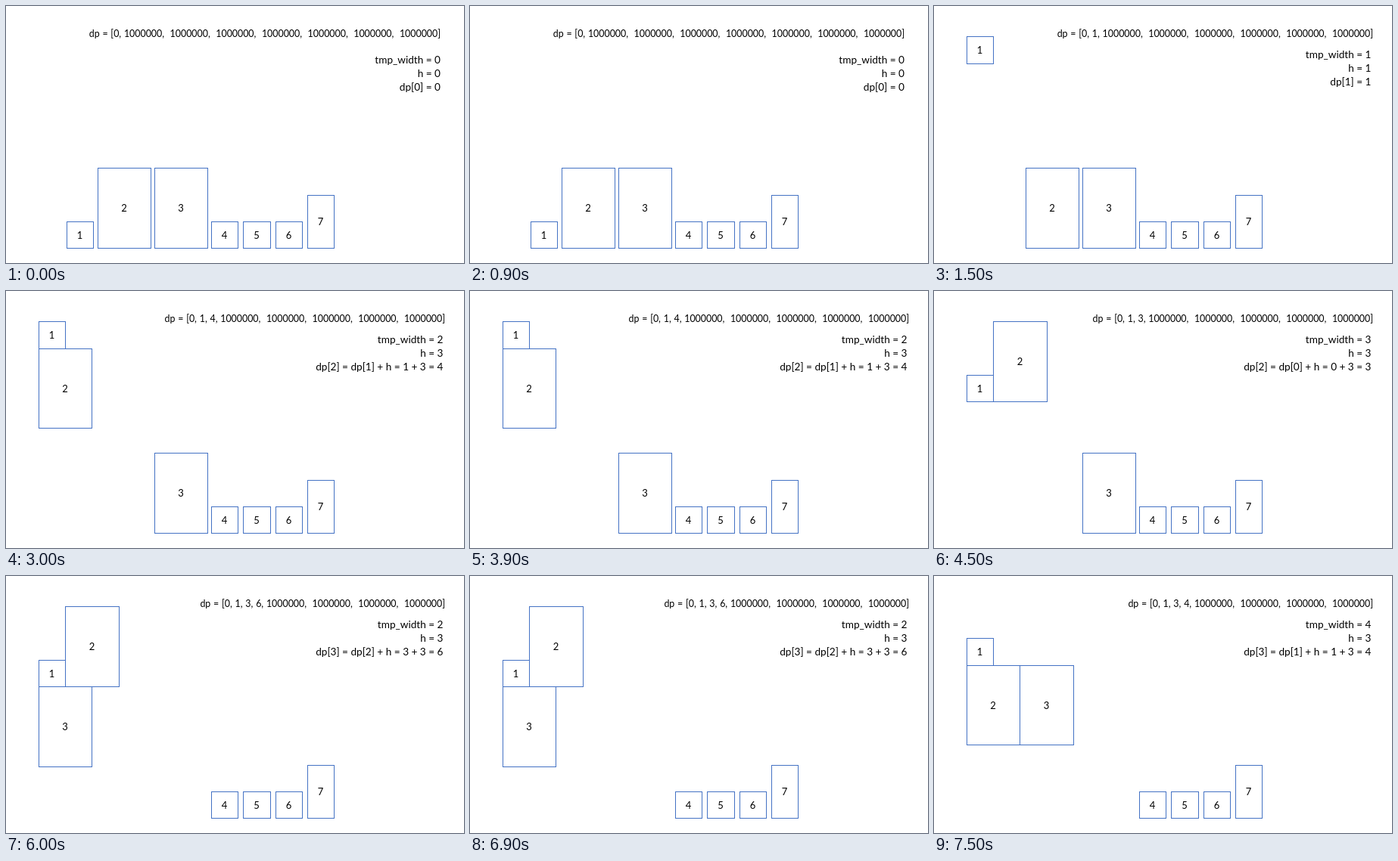
Animation, 605 px wide and 340 px high, one loop 8 s. Source, as an HTML page:

```html
<!DOCTYPE html>
<html lang="en">
<head>
<meta charset="utf-8">
<title>Bookshelf dynamic programming</title>
<style>
  html, body { margin: 0; width: 100%; height: 100%; overflow: hidden; background: #fff; }
  svg { display: block; width: 100%; height: 100%; }
  rect { fill: #fff; stroke: #4472c4; }
  text { font: 13.6px Lato, sans-serif; white-space: pre; text-anchor: end; }
  .label { font-size: 13px; text-anchor: middle; }
  .array { font-size: 12.4px; word-spacing: .6px; }
</style>
</head>
<body>
<svg id="stage" viewBox="0 0 605 340"></svg>
<script>
const STEP = 1500, LOOP = 8000;
const UNIT = 35.28, FLOOR = 320.7, SHELF_LEFT = 43.3, SHELF_TOP = 40.75;
const stage = document.getElementById('stage');

// Thickness and height in units; x is the place in the waiting row
const books = [
  { x: 80.3, w: 1, h: 1 }, { x: 121.3, w: 2, h: 3 }, { x: 196.3, w: 2, h: 3 },
  { x: 271.3, w: 1, h: 1 }, { x: 313.8, w: 1, h: 1 }, { x: 356.3, w: 1, h: 1 },
  { x: 398.3, w: 1, h: 2 }
];

// Each step arranges book numbers in rows, from top to bottom
const steps = [
  { rows: [] },
  { rows: [[1]] },
  { rows: [[1], [2]] },
  { rows: [[1, 2]] },
  { rows: [[1, 2], [3]] },
  { rows: [[1], [2, 3]], top: 82.75 }
];

const text = (x, y, value, cls = '') => `<text x="${x}" y="${y}" class="${cls}">${value}</text>`;

// Draws a book standing on the given bottom line, snapped to whole pixels
function drawBook(id, left, bottom) {
  const { w, h } = books[id - 1];
  const [x, y, right, base] =
    [left, bottom - h * UNIT, left + w * UNIT, bottom].map(Math.floor);
  return `<rect x="${x + .5}" y="${y + .5}" width="${right - x}" height="${base - y}"/>` +
    text((x + right) / 2, Math.round((y + base) / 2 + 5), id, 'label');
}

const rowHeight = row => Math.max(0, ...row.map(id => books[id - 1].h));
const rowWidth = row => row.reduce((sum, id) => sum + books[id - 1].w, 0);

function drawShelves(rows, bottom) {
  return rows.map(row => {
    bottom += rowHeight(row) * UNIT;
    let x = SHELF_LEFT;
    return row.map(id => {
      const drawn = drawBook(id, x, bottom);
      x += books[id - 1].w * UNIT;
      return drawn;
    }).join('');
  }).join('');
}

function drawArray(dp, right) {
  const unknown = Array(books.length + 1 - dp.length).fill('1000000').join(',  ');
  return text(right, 41, `dp = [${dp.join(', ')}, ${unknown}]`, 'array');
}

const dp = [0];
const pictures = steps.map(({ rows, top = SHELF_TOP }) => {
  const count = rows.flat().length;
  const lastRow = rows.at(-1) || [];
  const from = count - lastRow.length;
  const height = rowHeight(lastRow);
  dp[count] = dp[from] + height;

  const sum = count > 1 ? `dp[${from}] + h = ${dp[from]} + ${height} = ` : '';
  const notes = [
    `tmp_width = ${rowWidth(lastRow)}`,
    `h = ${height}`,
    `dp[${count}] = ${sum}${dp[count]}`
  ];
  const [arrayRight, noteRight, noteTop] = count ? [580, 577.5, 69] : [574, 574, 76];

  return books.map((book, i) => i < count ? '' : drawBook(i + 1, book.x, FLOOR)).join('') +
    drawShelves(rows, top) +
    drawArray(dp, arrayRight) +
    notes.map((note, i) => text(noteRight, noteTop + 18 * i, note)).join('');
});

let shown = -1;
function tick() {
  const index = Math.floor(performance.now() % LOOP / STEP);
  if (index !== shown) stage.innerHTML = pictures[shown = index];
  requestAnimationFrame(tick);
}
tick();
</script>
</body>
</html>
```
